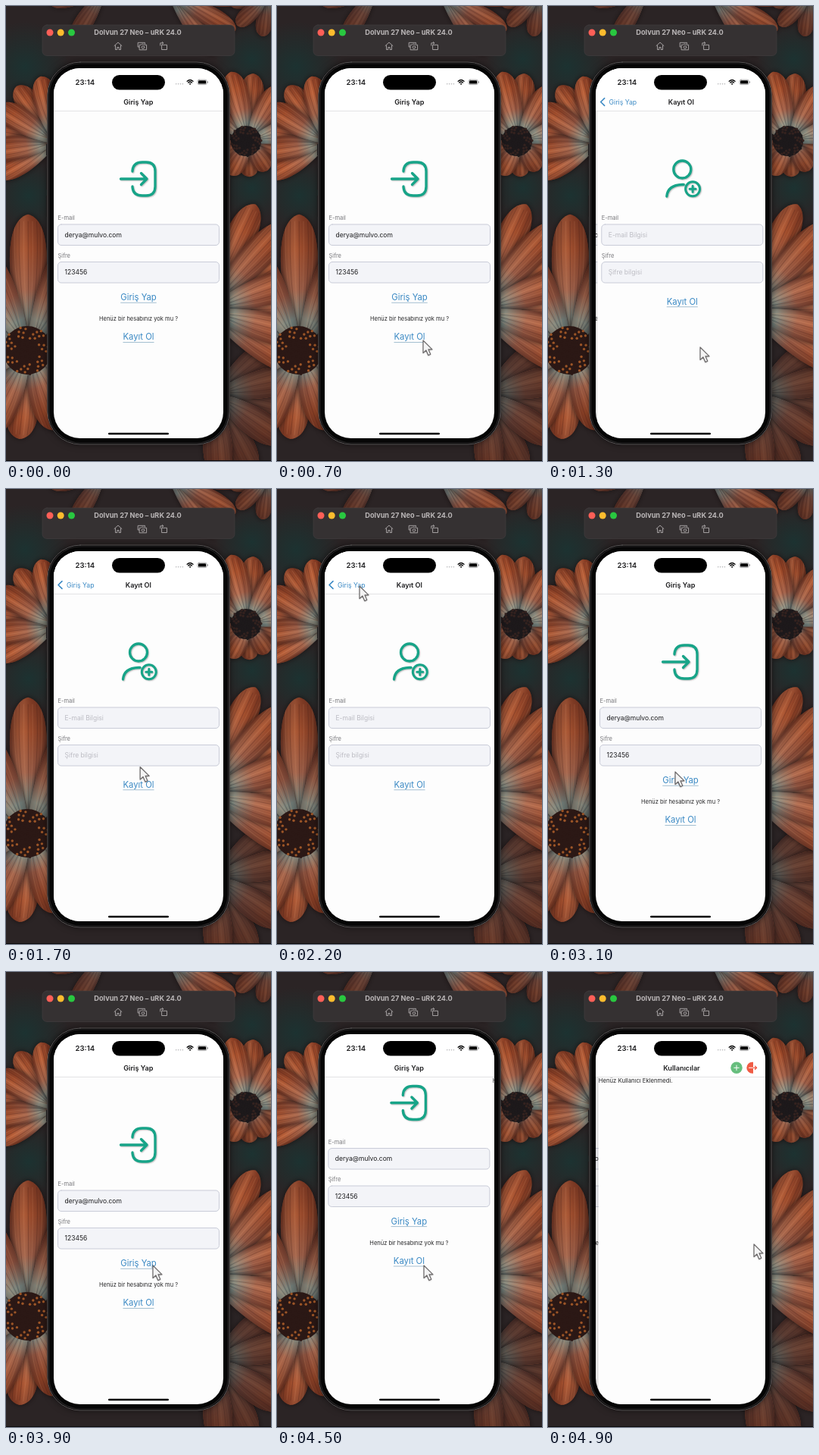
Animation of 350 by 600 pixels, one loop 5000 ms. Source, as an HTML page with a canvas:

```html
<!DOCTYPE html>
<html lang="tr">
<head>
<meta charset="utf-8">
<title>Giriş Yap</title>
<style>
html, body { margin: 0; width: 100%; height: 100%; overflow: hidden; background: #272223; }
canvas { display: block; width: 350px; height: 600px; }
</style>
</head>
<body>
<canvas id="stage"></canvas>
<script>
const W = 350, H = 600, LOOP = 5000, STEP = 100;
const FONT = 'Inter, "Liberation Sans", sans-serif';
const BLUE = '#3a89c4', GREEN = '#17a488', PAGE = '#fdfdfd', INK = '#1c1c1e';
const SCREEN = { x: 63, y: 82, w: 224, h: 488, r: 34.5 };
const HEADER_Y = 138.5;
const PUSH = 850, POP = 2330, ENTER = 4490;
const CURSOR = [
  [300, 356, 505], [700, 193, 441], [900, 193, 441], [1300, 201, 450], [1500, 201, 450],
  [2100, 109, 128], [2400, 109, 128], [3100, 168, 373], [3300, 168, 373],
  [3800, 194, 387], [4500, 194, 387], [4900, 272, 359], [5000, 276, 358]
];

const canvas = document.getElementById('stage');
const scale = window.devicePixelRatio || 1;
const wallpaper = document.createElement('canvas');
for (const c of [canvas, wallpaper]) {
  c.width = W * scale;
  c.height = H * scale;
  c.getContext('2d').scale(scale, scale);
}
let g = wallpaper.getContext('2d');

function rand(seed) {
  return () => (seed = (seed * 16807) % 2147483647) / 2147483647;
}

function box(x, y, w, h, r, fill, stroke, width = 1) {
  g.beginPath();
  g.roundRect(x, y, w, h, r);
  if (fill) { g.fillStyle = fill; g.fill(); }
  if (stroke) { g.strokeStyle = stroke; g.lineWidth = width; g.stroke(); }
}

function disc(x, y, r, fill) {
  g.beginPath();
  g.arc(x, y, r, 0, Math.PI * 2);
  g.fillStyle = fill;
  g.fill();
}

function line(d, color, width) {
  g.strokeStyle = color;
  g.lineWidth = width;
  g.lineCap = g.lineJoin = 'round';
  g.stroke(new Path2D(d));
}

function text(str, x, y, size, color, weight = 400, align = 'left') {
  g.font = `${weight} ${size}px ${FONT}`;
  g.textAlign = align;
  g.fillStyle = color;
  g.fillText(str, x, y);
}

function faded(alpha, draw) {
  if (alpha <= 0) return;
  g.save();
  g.globalAlpha *= Math.min(1, alpha);
  draw();
  g.restore();
}

// Wallpaper

function petal(x, y, angle, len, half, dim) {
  g.save();
  g.translate(x, y);
  g.rotate(angle);
  const tone = g.createLinearGradient(0, 0, len, 0);
  tone.addColorStop(0, '#2f4849');
  tone.addColorStop(0.25, '#7d9d99');
  tone.addColorStop(0.45, '#ad6a51');
  tone.addColorStop(0.75, '#b5562f');
  tone.addColorStop(1, '#8c3f25');
  g.beginPath();
  g.moveTo(0, -2);
  g.bezierCurveTo(len * 0.4, -half * 1.2, len * 0.95, -half * 1.6, len, 0);
  g.bezierCurveTo(len * 0.95, half * 1.6, len * 0.4, half * 1.2, 0, 2);
  g.save();
  g.shadowColor = 'rgba(20,12,12,.8)';
  g.shadowBlur = 7 * scale;
  g.fillStyle = tone;
  g.fill();
  g.restore();
  g.clip();
  // rounded shading across the petal
  const fold = g.createLinearGradient(0, -half, 0, half);
  fold.addColorStop(0, 'rgba(50,20,18,.55)');
  fold.addColorStop(0.4, 'rgba(235,150,105,.2)');
  fold.addColorStop(0.6, 'rgba(90,35,25,.15)');
  fold.addColorStop(1, 'rgba(50,20,18,.5)');
  g.fillStyle = fold;
  g.fillRect(0, -half * 2, len, half * 4);
  g.lineWidth = 1;
  for (let k = -0.75; k <= 0.75; k += 0.25) {
    g.beginPath();
    g.moveTo(len * 0.1, 0);
    g.quadraticCurveTo(len * 0.5, half * k * 1.3, len * 0.95, half * k);
    g.strokeStyle = k % 0.5 ? 'rgba(240,165,120,.2)' : 'rgba(70,28,22,.3)';
    g.stroke();
  }
  g.fillStyle = `rgba(40,30,31,${dim})`;
  g.fillRect(0, -half * 2, len, half * 4);
  g.restore();
}

function flower(x, y, from, to, count, len, half, dim, seed) {
  const next = rand(seed);
  for (let i = 0; i < count; i++) {
    const k = (i * 2) % count + (count % 2 || i < count / 2 ? 0 : 1);
    const deg = from + (to - from) * k / (count - 1) + (next() - 0.5) * 6;
    petal(x, y, deg * Math.PI / 180, len * (0.92 + next() * 0.14), half, dim + next() * 0.15);
  }
}

function seeds(x, y, r, base, dot) {
  disc(x, y, r, base);
  for (let i = 0; i < 90; i++) {
    const d = r * Math.sqrt(i / 90), a = i * 2.4;
    disc(x + d * Math.cos(a), y + d * Math.sin(a), 1.7, i % 3 && d > r * 0.5 ? dot : base);
  }
}

function paintWallpaper() {
  g.fillStyle = '#2b2425';
  g.fillRect(0, 0, W, H);
  for (const [x, y, r] of [[25, 80, 60], [30, 250, 50], [325, 70, 50], [325, 240, 45]]) {
    const glow = g.createRadialGradient(x, y, 0, x, y, r);
    glow.addColorStop(0, 'rgba(22,56,54,.7)');
    glow.addColorStop(1, 'rgba(22,56,54,0)');
    g.fillStyle = glow;
    g.fillRect(0, 0, W, H);
  }
  flower(215, -18, 8, 50, 3, 98, 12, 0.1, 13);
  flower(345, -12, 100, 170, 3, 55, 10, 0.4, 17);
  flower(130, -22, 125, 165, 2, 80, 11, 0.5, 19);
  flower(66, 180, 154, 255, 6, 92, 15, 0, 11);
  flower(320, 178, 25, 150, 5, 50, 12, 0.15, 21);
  flower(320, 178, 230, 345, 6, 90, 15, 0, 31);
  seeds(317, 178, 20, '#1d191b', '#33221f');
  flower(275, 512, -35, 85, 6, 112, 18, 0.5, 41);
  flower(264, 402, -62, 30, 7, 152, 19, 0, 51);
  flower(30, 455, 45, 190, 7, 118, 20, 0.05, 61);
  flower(30, 455, 218, 295, 4, 174, 23, 0.05, 71);
  seeds(28, 454, 32, '#2b1815', '#9c5527');
  g.fillStyle = '#0c0b0c';
  g.fillRect(0, 599, W, 1);
}

// Simulator window

function toolbar() {
  box(48, 25, 254, 40.5, 6, '#353132', '#454142', 0.6);
  disc(58, 35, 4.5, '#fe5f57');
  disc(72.2, 35, 4.5, '#febc2e');
  disc(86.5, 35, 4.5, '#29c840');
  text('Dolvun 27 Neo – uRK 24.0', 174, 38.3, 9.2, '#bab6b7', 700, 'center');
  const c = '#b0acad';
  line('M143 52.5 148 48 153 52.5 M144.5 52v5.5h2.3v-3h2.4v3h2.3V52', c, 0.9);
  line('M176 54h-1.8v-5.7h9.3v1.5 M176.5 51.2h2l.8-1h2.6l.8 1h2.9v6.6h-9.1z', c, 0.9);
  g.beginPath();
  g.arc(181, 54.4, 1.8, 0, 7);
  g.stroke();
  line('M206 51.3h6.5v6.2H206z M203.8 52v-3.2h3.8 M206.4 47.3l1.5 1.5-1.5 1.5', c, 0.9);
}

function phone() {
  g.save();
  g.shadowColor = 'rgba(0,0,0,.5)';
  g.shadowBlur = 8 * scale;
  box(54.5, 73.5, 241, 505, 43.5, '#121112');
  g.restore();
  g.fillStyle = '#1c1a1b';
  g.fillRect(53, 182, 2, 15);
  g.fillRect(53, 214, 2, 28);
  g.fillRect(53, 250, 2, 28);
  g.fillRect(295, 228, 2, 44);
  box(55, 74, 240, 504, 43, '#050505', '#5a5657', 1);
  box(57, 76, 236, 500, 41, null, '#232122', 1.2);
}

function statusBar() {
  text('23:14', 91.5, 104, 9.6, INK, 600);
  box(140, 91, 70, 19.5, 9.75, '#000');
  for (let i = 0; i < 4; i++) disc(224.7 + i * 2.9, 102.7, 0.8, '#b4b4b6');
  line('M239.2 99.2q3.9-3.5 7.8 0 M240.7 101q2.4-2 4.8 0', '#000', 1.3);
  disc(243.1, 102.7, 1, '#000');
  box(253, 97.2, 12.2, 6.4, 2, null, '#8b8b8d', 0.7);
  box(254, 98.2, 10.2, 4.4, 1.2, '#000');
  box(266, 99.2, 1, 2.4, 0.5, '#8b8b8d');
}

// Pages

function field(label, y, value, color) {
  text(label, 68.5, y - 5.2, 7.5, '#77777b');
  box(68.5, y + 0.5, 213, 27.5, 4.5, '#f3f4f8', '#c9ccd8', 1);
  text(value, 77.5, y + 17.3, 8.5, color);
}

function link(label, y) {
  text(label, 175, y, 11.3, BLUE, 400, 'center');
  const w = g.measureText(label).width;
  g.fillStyle = '#8fb0c6';
  g.fillRect(175 - w / 2, y + 2.8, w, 0.8);
}

function icon(draw) {
  g.save();
  g.shadowColor = 'rgba(0,0,0,.25)';
  g.shadowBlur = 1.5 * scale;
  g.shadowOffsetX = g.shadowOffsetY = scale;
  draw();
  g.restore();
}

function loginPage() {
  icon(() => line('M167 218v-1Q168 206 180 206h5Q197 206 197 218v20Q197 250 185 250h-5Q168 250 167 239v-1 ' +
    'M151.5 228H185 M178.5 220.5 186 228 178.5 235.5', GREEN, 3.3));
  field('E-mail', 287.5, 'derya@mulvo.com', INK);
  field('Şifre', 337, '123456', INK);
  link('Giriş Yap', 388);
  text('Henüz bir hesabınız yok mu ?', 175, 415.2, 7.5, '#262628', 400, 'center');
  link('Kayıt Ol', 440.3);
}

function registerPage() {
  icon(() => {
    line('M163.5 215.5a11.5 11.5 0 1 0 23 0a11.5 11.5 0 1 0-23 0 M154.5 251Q156 236 175 235.5h2', GREEN, 3.3);
    line('M179.3 241.3a9.5 9.5 0 1 0 19 0a9.5 9.5 0 1 0-19 0 M184.8 241.3h8 M188.8 237.3v8', GREEN, 3);
  });
  field('E-mail', 287.5, 'E-mail Bilgisi', '#bcbcc3');
  field('Şifre', 337, 'Şifre bilgisi', '#bcbcc3');
  link('Kayıt Ol', 393.6);
}

function usersPage() {
  text('Henüz Kullanıcı Eklenmedi.', 63, 146.2, 7.7, '#262628');
}

function layer(draw, x, y = 0) {
  g.save();
  g.translate(x, 0);
  g.fillStyle = PAGE;
  g.fillRect(SCREEN.x, 82, SCREEN.w, 488);
  g.translate(0, y);
  draw();
  g.restore();
}

// Slides a page over the login page, p = 1 when fully covered.
function stack(top, p, lift) {
  layer(loginPage, -0.3 * SCREEN.w * p, p > 0 ? lift : 0);
  if (p <= 0) return;
  const x = SCREEN.w * (1 - p);
  g.fillStyle = `rgba(0,0,0,${0.1 * p})`;
  g.fillRect(SCREEN.x, 82, x, 488);
  layer(top, x);
}

function title(str, dx, alpha) {
  faded(alpha, () => text(str, 174.8 + dx, 129.5, 9.1, INK, 600, 'center'));
}

function backButton() {
  line('M74 121.6 69 126.5 74 131.4', BLUE, 1.6);
  text('Giriş Yap', 80, 129.5, 8.7, BLUE);
}

function userActions() {
  disc(249, 126.3, 7.7, '#63bd7b');
  line('M245.8 126.3h6.4 M249 123.1v6.4', '#fff', 1);
  g.fillStyle = '#f0573f';
  g.fill(new Path2D('M271 118.8v15h-1.2a7.5 7.5 0 0 1 0-15z'));
  line('M265.5 126.3h5', '#fff', 1.1);
  line('M271.5 126.3h4 M273.4 124.1l2.2 2.2-2.2 2.2', '#f0573f', 1.3);
}

function header(reg, users) {
  g.fillStyle = '#fff';
  g.fillRect(SCREEN.x, 82, SCREEN.w, HEADER_Y - 82);
  g.fillStyle = '#dcdcde';
  g.fillRect(SCREEN.x, HEADER_Y - 0.5, SCREEN.w, 0.8);
  const away = Math.max(reg, users);
  title('Giriş Yap', -76 * reg - 50 * users, 1 - away * 1.6);
  title('Kayıt Ol', 100 * (1 - reg), reg * 1.6 - 0.6);
  title('Kullanıcılar', 100 * (1 - users), users * 1.6 - 0.6);
  faded(reg * 1.6 - 0.6, () => {
    g.translate(60 * (1 - reg), 0);
    backButton();
  });
  faded(users * 1.6 - 0.6, userActions);
}

// Motion

function spring(ms) {
  const k = Math.max(0, ms) * 0.0147;
  const p = 1 - (1 + k) * Math.exp(-k);
  return p > 0.997 ? 1 : p;
}

function cursorAt(t) {
  const i = CURSOR.findIndex(k => k[0] > t);
  if (i < 1) return null;
  const [t0, x0, y0] = CURSOR[i - 1], [t1, x1, y1] = CURSOR[i];
  const u = (t - t0) / (t1 - t0), e = u * u * (3 - 2 * u);
  return [x0 + (x1 - x0) * e, y0 + (y1 - y0) * e];
}

function pointer(t) {
  const at = cursorAt(t);
  if (!at) return;
  g.save();
  g.translate(...at);
  g.shadowColor = 'rgba(0,0,0,.35)';
  g.shadowBlur = 2 * scale;
  g.shadowOffsetY = scale;
  const arrow = new Path2D('M0 0V16.6L3.9 13 6.8 19.6 9.8 18.3 7 11.9H12z');
  g.fillStyle = '#f4f4f4';
  g.fill(arrow);
  g.shadowColor = 'transparent';
  g.strokeStyle = '#6b6869';
  g.lineWidth = 1.2;
  g.lineJoin = 'round';
  g.stroke(arrow);
  g.restore();
}

function render(t) {
  const reg = t < POP ? spring(t - PUSH) : 1 - spring(t - POP);
  const users = spring(t - ENTER);
  g.drawImage(wallpaper, 0, 0, W, H);
  toolbar();
  phone();
  g.save();
  g.beginPath();
  g.roundRect(SCREEN.x, SCREEN.y, SCREEN.w, SCREEN.h, SCREEN.r);
  g.clip();
  if (users > 0) stack(usersPage, users, -55.5);
  else stack(registerPage, reg, 0);
  header(reg, users);
  statusBar();
  box(135, 562.7, 80, 2.5, 1.25, '#000');
  g.restore();
  pointer(t);
}

paintWallpaper();
g = canvas.getContext('2d');
const start = performance.now();
function tick() {
  const t = (performance.now() - start) % LOOP;
  render(Math.floor(t / STEP) * STEP);
  requestAnimationFrame(tick);
}
tick();
</script>
</body>
</html>
```
